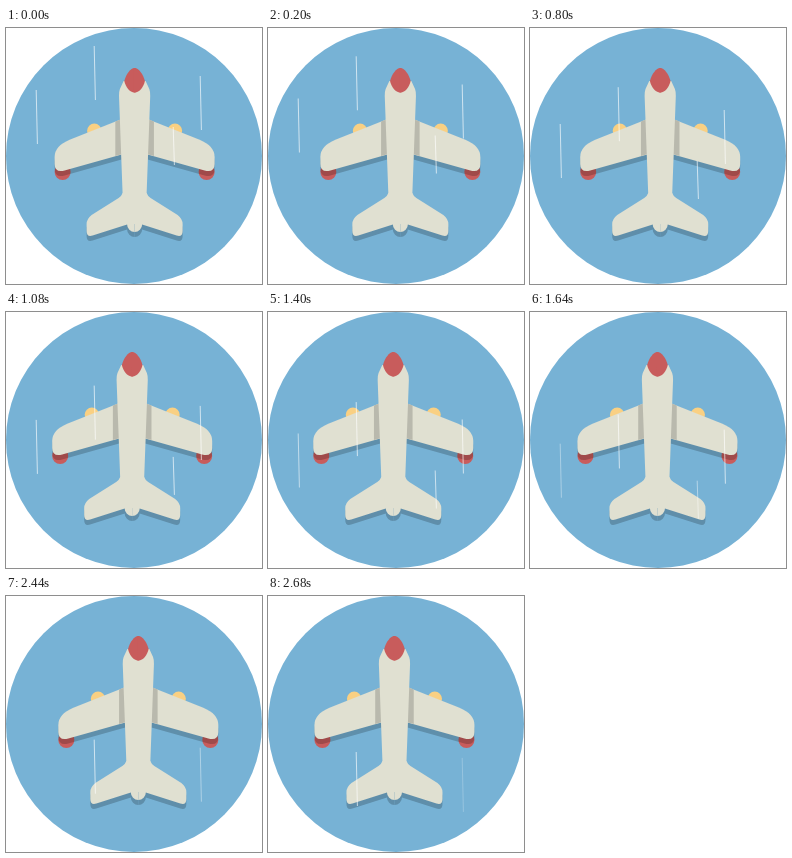
An HTML page with a canvas for the animation above (2.72 s loop, 256 px wide and 256 px high).

```html
<!DOCTYPE html>
<html lang="en">
<head>
<meta charset="utf-8">
<title>Plane</title>
<style>
  html, body { margin: 0; width: 100%; height: 100%; overflow: hidden; background: #fff; }
  canvas { display: block; width: 256px; height: 256px; }
</style>
</head>
<body>
<canvas id="stage" width="256" height="256"></canvas>
<script>
const ctx = document.getElementById('stage').getContext('2d');
const LOOP = 2720, STEP = 40, FADE = 900;
const SKY = '#77b2d5', BODY = '#e0e0d1', SHADE = '#b9b9ad', RED = '#c85c5c',
      YELLOW = '#f9d083', DIM = 'rgba(0,0,0,.2)', SKY_DIM = '#5f8eaa';

// The plane sways between two positions, turning at these times
const LEFT = 125, RIGHT = 134;
const turns = [-310, 400, 1290, 2290, 2820];

const streaks = [
  { x: 30.2, top: 62, end: 2160 },
  { x: 88.2, top: 18, end: 3600, speed: .0515 },
  { x: 167.2, top: 99, end: 2260, length: 38 },
  { x: 194.2, top: 48, end: 3000 }
];

// Left halves; the plane's axis is x = 0
const wing = new Path2D('M-14 91.5 L-65 111.8 Q-80 118 -80 129 V136 Q-80 145 -70 142.6 L-13 126.6 Z');
const root = new Path2D('M-19.3 93.6 L-14 91.5 L-12 126 L-19.3 128 Z');
const tail = new Path2D('M-12 165 Q-13 168 -16 170 L-43 187 Q-48 191 -48 196 V203 Q-48 209.5 -42 207.6 L-7.5 196.5 A7.5 7.5 0 0 0 0 204 V165 Z');
const hull = new Path2D('M1 53 H-11 L-14.7 61 Q-15.8 64 -15.6 68 L-12 166 L-7.5 196 H1 Z');
const nose = new Path2D('M1 40 H0 C-4 40 -8.5 46 -10.3 53 C-9 59 -5 64.5 0 64.5 H1 Z');

function planeX(t) {
  const i = turns.findIndex(time => time > t);
  const u = (t - turns[i - 1]) / (turns[i] - turns[i - 1]);
  const eased = (1 - Math.cos(Math.PI * u)) / 2;
  return LEFT + (RIGHT - LEFT) * (i % 2 ? eased : 1 - eased);
}

function fill(path, color, dy = 0) {
  ctx.save();
  ctx.translate(0, dy);
  ctx.fillStyle = color;
  ctx.fill(path);
  ctx.restore();
}

function disc(x, y, r, color) {
  const circle = new Path2D();
  circle.arc(x, y, r, 0, 2 * Math.PI);
  fill(circle, color);
}

function mirrored(draw) {
  for (const side of [1, -1]) {
    ctx.save();
    ctx.scale(side, 1);
    draw();
    ctx.restore();
  }
}

function drawPlane(x) {
  ctx.save();
  ctx.translate(x, 0);
  mirrored(() => {
    disc(-40.3, 102.8, 7.2, YELLOW);
    disc(-72, 144, 8, RED);
    fill(wing, DIM, 5);
    fill(wing, BODY);
    fill(root, SHADE);
    fill(tail, SKY_DIM, 5);
  });
  mirrored(() => {
    fill(tail, BODY);
    fill(hull, BODY);
  });
  mirrored(() => fill(nose, RED));
  ctx.restore();
}

function drawStreak({ x, top, end, length = 54, speed = .0425 }, t) {
  const alpha = .65 * Math.min(1, Math.max(0, (end - t) / FADE));
  const y = top + speed * t;
  ctx.strokeStyle = `rgba(255,255,255,${alpha})`;
  ctx.beginPath();
  ctx.moveTo(x, y);
  ctx.lineTo(x + 1.2, y + length);
  ctx.stroke();
}

function render(now) {
  const t = Math.floor(now % LOOP / STEP) * STEP;
  ctx.clearRect(0, 0, 256, 256);
  disc(128, 128, 128, SKY);
  drawPlane(planeX(t));
  streaks.forEach(streak => drawStreak(streak, t));
}

function tick() {
  render(performance.now());
  requestAnimationFrame(tick);
}
tick();
</script>
</body>
</html>
```
